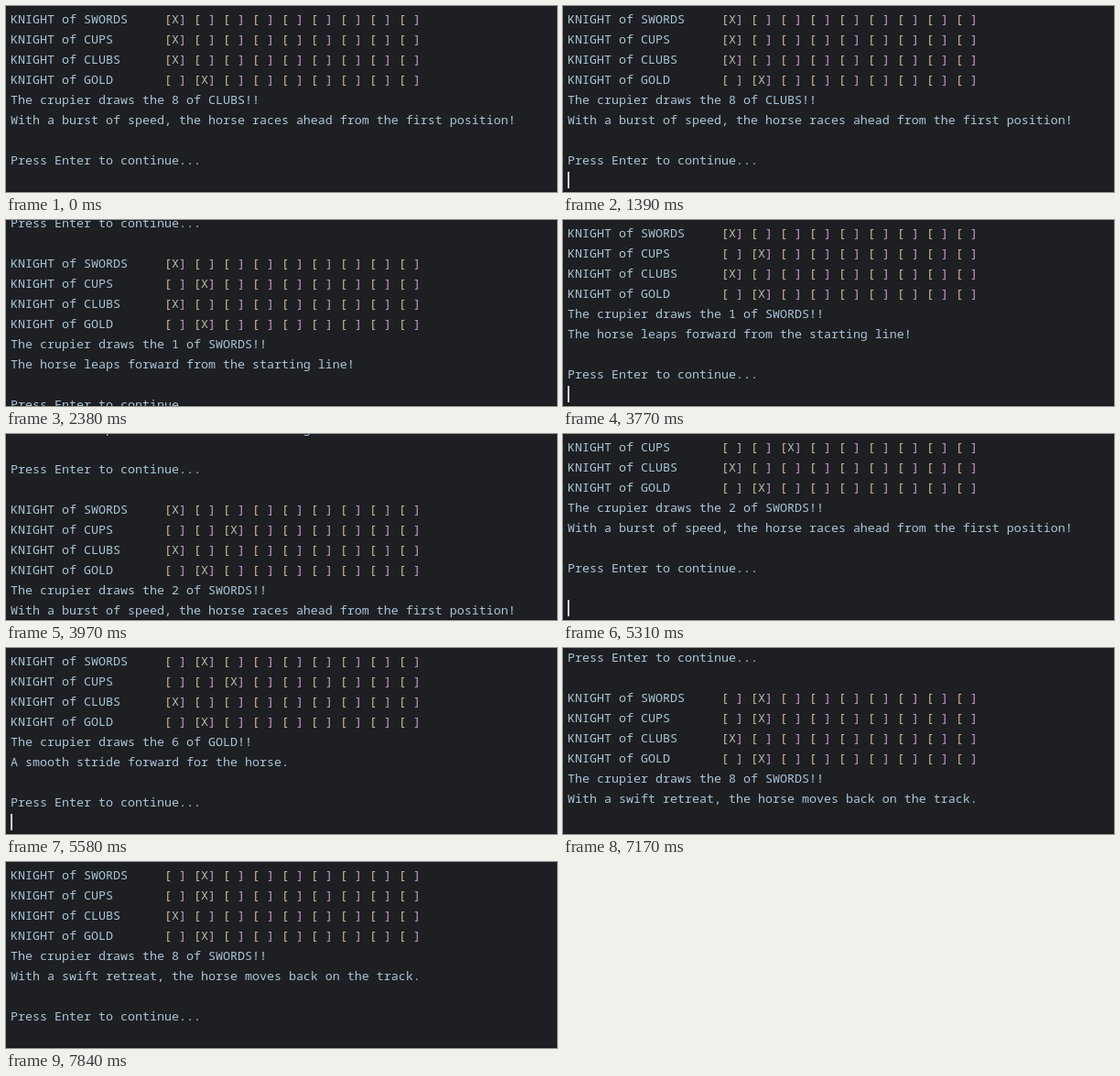
Write an HTML page that moves like this. It is 602 px wide and 203 px high and loops after 8.37 s.

```html
<!DOCTYPE html>
<html lang="en">
<head>
<meta charset="utf-8">
<title>Horse race console</title>
<style>
  html, body { margin: 0; width: 100%; height: 100%; overflow: hidden; background: #1e1f22; }
  #stage { position: relative; width: 602px; height: 203px; overflow: hidden; }
  #stage::before { content: ""; position: absolute; left: 0; right: 0; bottom: 0; height: 1px; background: #1a161a; }
  pre {
    position: absolute; left: 5px; top: 3px; margin: 0;
    font: 13.3333px/22px "Noto Sans Mono", monospace;
    color: #a9c6da;
  }
  .open { color: #d6bd97; }
  .close { color: #cd9bd4; }
  .mark { color: #bdbcb2; }
  #caret { position: absolute; width: 2px; height: 18px; background: #ced0d6; }
</style>
</head>
<body>
<div id="stage"><div id="caret"></div></div>
<script>
const LOOP = 8370;
const LINE = 22;
const ROUND_HEIGHT = 9 * LINE;
const CELLS = 9;
const suits = ["SWORDS", "CUPS", "CLUBS", "GOLD"];
const burst = "With a burst of speed, the horse races ahead from the first position!";

// Position of each knight, card drawn, comment
const rounds = [
  [[1, 1, 1, 2], "8 of CLUBS", burst],
  [[1, 2, 1, 2], "1 of SWORDS", "The horse leaps forward from the starting line!"],
  [[1, 3, 1, 2], "2 of SWORDS", burst],
  [[2, 3, 1, 2], "6 of GOLD", "A smooth stride forward for the horse."],
  [[2, 2, 1, 2], "8 of SWORDS", "With a swift retreat, the horse moves back on the track."]
];

const PROMPT = [5, 181];
const CLICKED = [276, 93];

// Start time, last printed round, pixels left to scroll, caret position
const states = [
  [0, 0, 0, null],
  [720, 0, 0, CLICKED],
  [1390, 0, 0, PROMPT],
  [2250, 0, -LINE, PROMPT],
  [2380, 1, 33, null],
  [2450, 1, 0, PROMPT],
  [3240, 1, 0, null],
  [3770, 1, 0, PROMPT],
  [3970, 2, 68, null],
  [4040, 2, 0, PROMPT],
  [4780, 2, 0, null],
  [5310, 2, -LINE, PROMPT],
  [5510, 3, 34, null],
  [5580, 3, 0, PROMPT],
  [6310, 3, 0, null],
  [6840, 3, 0, PROMPT],
  [7170, 4, 40, null],
  [7240, 4, 0, PROMPT],
  [7840, 4, 0, null]
];

const span = (name, text) => `<span class="${name}">${text}</span>`;

function track(suit, position) {
  const cells = Array.from({ length: CELLS }, (_, i) =>
    span("open", "[") + (i + 1 === position ? span("mark", "X") : " ") + span("close", "]"));
  return `KNIGHT of ${suit}`.padEnd(21) + cells.join(" ");
}

const stage = document.getElementById("stage");
const caret = document.getElementById("caret");

const blocks = rounds.map(([positions, card, comment]) => {
  const block = document.createElement("pre");
  block.innerHTML = [
    ...suits.map((suit, i) => track(suit, positions[i])),
    `The crupier draws the ${card}!!`,
    comment,
    "",
    "Press Enter to continue..."
  ].join("\n");
  stage.insertBefore(block, caret);
  return block;
});

function draw(now) {
  const time = now % LOOP;
  const [, printed, offset, caretAt] = states.filter(([start]) => start <= time).pop();
  blocks.forEach((block, i) => {
    block.style.visibility = i <= printed ? "visible" : "hidden";
    block.style.top = 3 + offset + (i - printed) * ROUND_HEIGHT + "px";
  });
  caret.style.visibility = caretAt ? "visible" : "hidden";
  if (caretAt) {
    caret.style.left = caretAt[0] + "px";
    caret.style.top = caretAt[1] + "px";
  }
}

const origin = performance.now();
function tick() {
  draw(performance.now() - origin);
  requestAnimationFrame(tick);
}
tick();
</script>
</body>
</html>
```
